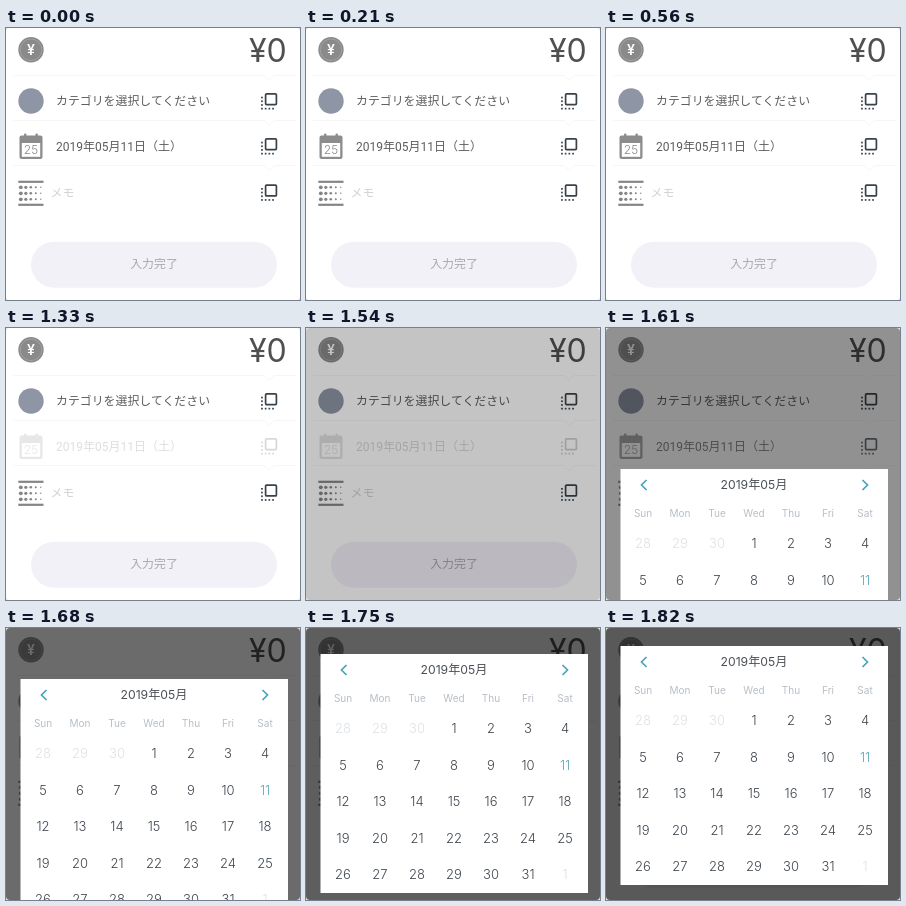
An HTML page for the animation above (4340 ms loop, 294 by 272 pixels).

```html
<!DOCTYPE html>
<html lang="ja">
<head>
<meta charset="utf-8">
<style>
  html, body { margin: 0; width: 100%; height: 100%; overflow: hidden; background: #e6e6e6; }
  svg { display: block; width: 294px; height: 272px; }
  text { font-family: Inter, "Noto Sans CJK JP", "Noto Sans CJK", sans-serif; font-size: 11.92px; fill: #5c5c5c; }
  .mid { text-anchor: middle; }
  .light { font-weight: 300; }
  .date { font-family: Roboto, "Noto Sans CJK JP", "Noto Sans CJK", sans-serif; font-size: 12px; }
  .line { fill: none; stroke: #f6f6f6; stroke-width: 1; }
</style>
</head>
<body>
<svg id="stage" viewBox="0 0 294 272"></svg>
<script>
const LOOP = 4340;
const NS = "http://www.w3.org/2000/svg";
const stage = document.getElementById("stage");

function add(parent, tag, attrs = {}, text) {
  const el = document.createElementNS(NS, tag);
  for (const key in attrs) el.setAttribute(key, attrs[key]);
  if (text !== undefined) el.textContent = text;
  return parent.appendChild(el);
}
const rect = (p, x, y, width, height, fill, rx = 0) =>
  add(p, "rect", { x, y, width, height, fill, rx });
const circle = (p, cx, cy, r, fill) => add(p, "circle", { cx, cy, r, fill });
const label = (p, x, y, text, style = "", cls = "") =>
  add(p, "text", { x, y, style, class: cls }, text);

// Divider with a small notch pointing down
function divider(y) {
  add(stage, "path", { class: "line", d: `M7 ${y}H258l5 5 5-5H290` });
}

// Framed square in front of a dotted one
function frontIcon(p, y) {
  const ink = "#38424a";
  add(p, "rect", {
    x: 259.6, y: y - 7.2, width: 10.8, height: 10.8, rx: 1,
    fill: "none", stroke: ink, "stroke-width": 1.7
  });
  for (let i = 0; i < 4; i++) {
    rect(p, 255.1, y - 4.3 + i * 3.7, 1.7, 1.7, ink);
    if (i) rect(p, 255.1 + i * 3.7, y + 6.8, 1.7, 1.7, ink);
  }
}

function coin(p) {
  circle(p, 25, 21.8, 12.7, "#8a8a8a");
  add(p, "circle", { cx: 25, cy: 21.8, r: 10.8, fill: "none", stroke: "#a9a9a9", "stroke-width": 0.7 });
  label(p, 25, 26.8, "¥", "font-size:14px;font-weight:600;fill:#fff", "mid");
}

function calendarIcon(p) {
  const ink = "#8c8c8c";
  rect(p, 13.5, 107.5, 23, 23.5, ink, 2);
  rect(p, 15.8, 115, 18.4, 13.8, "#fff");
  for (const x of [18, 29.5]) rect(p, x, 105.5, 2.4, 4, ink, 1);
  label(p, 25, 126.4, "25", "font-size:12px;fill:#888", "mid light");
}

function memoIcon(p) {
  const ink = "#858585";
  rect(p, 12.3, 152.7, 25.2, 2.2, ink);
  rect(p, 12.3, 175.7, 25.2, 2.2, ink);
  for (let row = 0; row < 3; row++)
    for (let col = 0; col < 5; col++)
      circle(p, 14.8 + col * 5, 159.3 + row * 6, 1.9 - col * 0.3, ink);
}

function buildForm() {
  rect(stage, 0, 0, 294, 272, "#fff", 4);
  [47.5, 92.5, 137.5].forEach(divider);
  coin(stage);
  label(stage, 280.7, 33.5, "¥0", "font-size:32px;fill:#505050;text-anchor:end");

  circle(stage, 25, 73, 12.7, "#8e95a5");
  label(stage, 50, 77.3, "カテゴリを選択してください");
  frontIcon(stage, 73);

  const dateRow = add(stage, "g");
  calendarIcon(dateRow);
  label(dateRow, 50, 122.5, "2019年05月11日（土）", "", "date");
  frontIcon(dateRow, 118);

  memoIcon(stage);
  label(stage, 44.5, 168.7, "メモ", "fill:#d2d2d4");
  frontIcon(stage, 164.3);

  rect(stage, 25, 213.7, 246, 46, "#f3f1f8", 23);
  label(stage, 148, 240, "入力完了", "fill:#aaa8ab", "mid");
  return dateRow;
}

function buildPicker() {
  const g = add(stage, "g");
  const column = i => 37 + i * 37;
  rect(g, 14.5, 0, 267.5, 239, "#fff");
  label(g, 148, 20.3, "2019年05月", "font-size:12.2px;fill:#4a4f55", "mid");
  for (const d of ["M40.5 11l-5 5 5 5", "M256.5 11l5 5-5 5"])
    add(g, "path", { d, fill: "none", stroke: "#45a5b8", "stroke-width": 1.7 });
  ["Sun", "Mon", "Tue", "Wed", "Thu", "Fri", "Sat"].forEach((name, i) =>
    label(g, column(i), 48, name, "font-size:10px;fill:#b6bec6", "mid"));
  for (let i = 0; i < 35; i++) {
    const d = i - 2;
    const day = d < 1 ? d + 30 : d > 31 ? d - 31 : d;
    const fill = day !== d ? "#dde1e5" : day === 11 ? "#5aa5bd" : "#3c444c";
    label(g, column(i % 7), 79.3 + Math.floor(i / 7) * 36.4, day,
      `font-size:13px;fill:${fill}`, "mid light");
  }
  return g;
}

const dateRow = buildForm();
const dim = rect(stage, 0, 0, 294, 272, "#000", 4);
const picker = buildPicker();

// Start time, date row opacity, backdrop opacity, picker top
const STEPS = [
  [0, 1, 0, 290],
  [1330, 0.2, 0, 290],
  [1540, 0.25, 0.23, 290],
  [1610, 0.75, 0.43, 141],
  [1680, 1, 0.58, 51],
  [1750, 1, 0.63, 26],
  [1820, 1, 0.65, 18]
];

function draw(now) {
  const t = now % LOOP;
  const [, row, shade, top] = STEPS.findLast(step => step[0] <= t);
  dateRow.setAttribute("opacity", row);
  dim.setAttribute("opacity", shade);
  picker.setAttribute("transform", `translate(0 ${top})`);
}

const start = performance.now();
function tick() {
  draw(performance.now() - start);
  requestAnimationFrame(tick);
}
tick();
</script>
</body>
</html>
```
